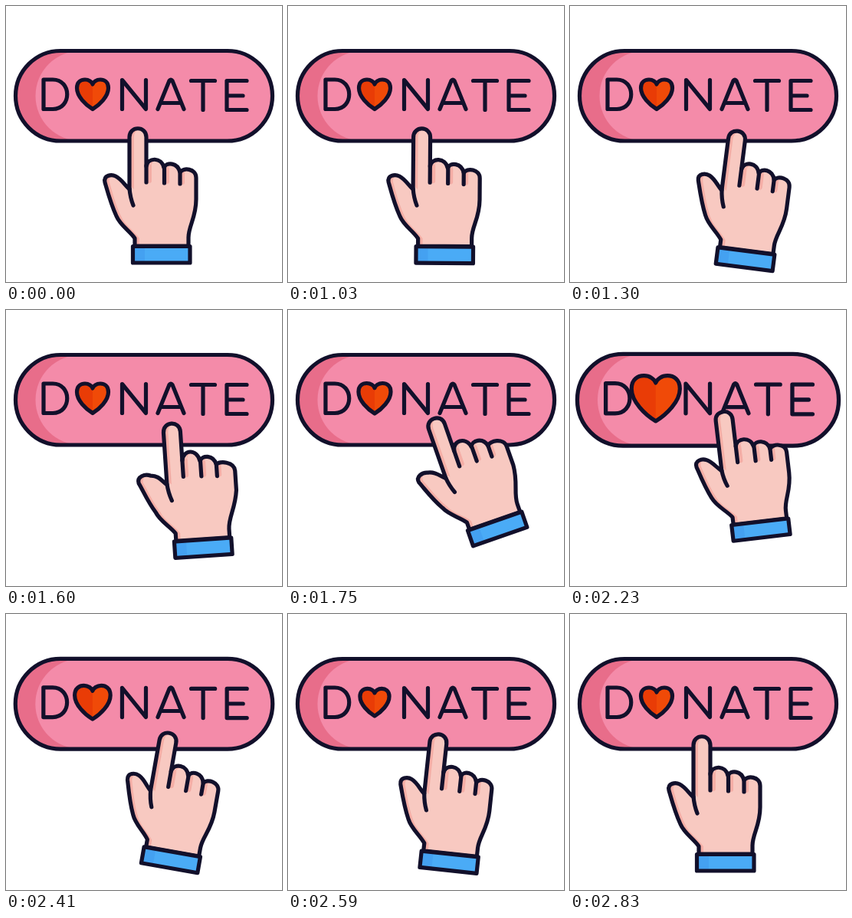
Animation, 360 px wide and 360 px high, one loop 2860 ms. Source, as an HTML page:

```html
<!DOCTYPE html>
<html lang="en">
<head>
<meta charset="utf-8">
<title>Donate button</title>
<style>
  html, body { margin: 0; height: 100%; overflow: hidden; background: #fff; }
  svg { display: block; width: 100%; height: 100%; }
  .line { fill: none; stroke: #12102b; stroke-width: 5.2; stroke-linecap: round; stroke-linejoin: round; }
  .shade { fill: none; stroke: #f5aea6; stroke-width: 6; stroke-linecap: round; }
  #heartShape { vector-effect: non-scaling-stroke; }
</style>
</head>
<body>
<svg viewBox="0 0 360 360">
  <defs>
    <rect id="pill" x="12.5" y="58.5" width="335" height="117.5" rx="58.75"/>
    <clipPath id="pillClip"><use href="#pill"/></clipPath>
    <path id="palm"/>
    <clipPath id="palmClip"><use href="#palm"/></clipPath>
    <path id="heartShape" d="M113 134.5C104 129 92.5 118 92.5 107C92.5 99 98 96 103 96
      C108 96 112 99 113 102C114 99 118 96 123 96C128 96 133.5 99 133.5 107
      C133.5 118 122 129 113 134.5Z"/>
    <clipPath id="rightHalf"><rect x="113" y="90" width="30" height="50"/></clipPath>
  </defs>

  <g id="button">
    <g clip-path="url(#pillClip)">
      <use href="#pill" fill="#e86d8a"/>
      <use href="#pill" x="26" fill="#f48ba9"/>
    </g>
    <use href="#pill" class="line"/>
    <g class="line" role="img" aria-label="DONATE">
      <path d="M49 96H61C86 96 86 134.5 61 134.5H49Z"/>
      <path d="M151.5 134.5V96.5L182.5 134.5V96.5"/>
      <path d="M198 134.5L213 97.5Q215 94.5 217 97.5L232 134.5M202 126.500H228"/>
      <path d="M241.5 97.500H272.5M257 97.500V135.500"/>
      <path d="M314 97.500H288V135.500H314M288 117H309"/>
    </g>
    <g id="heart">
      <use href="#heartShape" fill="#e93c06"/>
      <use href="#heartShape" fill="#f04a08" clip-path="url(#rightHalf)"/>
      <use href="#heartShape" class="line"/>
    </g>
  </g>

  <g id="hand">
    <g clip-path="url(#palmClip)">
      <use href="#palm" fill="#f5aea6"/>
      <use href="#palm" x="6" fill="#f8c9c1"/>
      <path class="shade" d="M187 209V228M210 213V229M230 218V230"/>
    </g>
    <use href="#palm" class="line"/>
    <path class="line" d="M161 238Q162 250 166 260M183 208V230M206.5 211V231M227 216V232"/>
    <path d="M165.5 313.5H240V335H165.5Z" fill="#4aabf6"/>
    <path d="M165.5 313.5H181V335H165.5Z" fill="#44a1f1"/>
    <path class="line" d="M165.5 313.5H240V335H165.5Z"/>
  </g>
</svg>
<script>
const LOOP = 2860, START = 1030, STEP = 30;
const [button, heart, hand, palm] =
  ['button', 'heart', 'hand', 'palm'].map(id => document.getElementById(id));

// Sine ease from 0 at time a to 1 at time b.
const ease = (t, a, b) =>
  (1 - Math.cos(Math.PI * Math.min(1, Math.max(0, (t - a) / (b - a))))) / 2;
// Rises from 0 to 1 and falls back as p goes from 0 to 1.
const arc = p => Math.sin(Math.PI * p);

const scaleAbout = (x, y, s) => `translate(${x} ${y}) scale(${s}) translate(${-x} ${-y})`;

// Hand outline; spread 1 opens the thumb and little finger.
const palmPath = s => {
  const thumb = `${129 - 5 * s} ${230 + 5 * s}`;
  return `M168 313V303C161 293 149 286 144 274C${137 - 3 * s} 259 ${133 - 4 * s} 244 ${thumb}
    C${127 - 5 * s} ${221 + 5 * s} ${137 - 4 * s} ${219 + 4 * s} ${143 - 3 * s} ${222 + 4 * s}
    C151 226 155 234 161 239V171C161 156 183 156 183 171V209
    C185 ${197 - 3 * s} 203 ${197 - 3 * s} 206 211C209 203 224 204 227 217
    C231 ${210 + 2 * s} ${248 + 3 * s} ${212 + 3 * s} ${248 + 3 * s} ${224 + 3 * s}
    V252C248 276 238 287 238 302V313Z`;
};

function draw(now) {
  let t = now % LOOP;
  t = t < START ? 0 : START + STEP * Math.floor((t - START) / STEP);

  // The hand winds up, presses, springs back past its rest and settles.
  const windUp = ease(t, 970, 1380), press = ease(t, 1380, 1990);
  const release = ease(t, 1990, 2410), settle = ease(t, 2410, 2830);
  const x = 171 + 50 * windUp - 63 * press + 52 * release - 39 * settle
    + 16 * arc(press) + 11 * arc(release);
  const y = 171 + 3.5 * windUp - 15.5 * press + 7 * release + 5 * settle
    - 13.5 * arc(press) - 21 * arc(release);
  const angle = 8 * windUp - 41 * press + 43 * release - 10 * settle;
  const squash = 1 - 0.045 * arc(ease(t, 1600, 2590));
  hand.setAttribute('transform',
    `translate(${x} ${y}) rotate(${angle}) scale(1 ${squash}) translate(-171 -171)`);
  palm.setAttribute('d', palmPath(arc(ease(t, 1380, 1900))));

  const push = 1 - 0.05 * ease(t, 1750, 1990) + 0.068 * ease(t, 1990, 2230)
    - 0.018 * ease(t, 2230, 2450);
  button.setAttribute('transform', scaleAbout(180, 117.5, push));

  const beat = 1 + 0.64 * ease(t, 1700, 2090) - 0.71 * ease(t, 2090, 2590)
    + 0.07 * ease(t, 2590, 2830);
  heart.setAttribute('transform', scaleAbout(113, 115, beat));
}

const begin = performance.now();
function tick() {
  draw(performance.now() - begin);
  requestAnimationFrame(tick);
}
tick();
</script>
</body>
</html>
```
